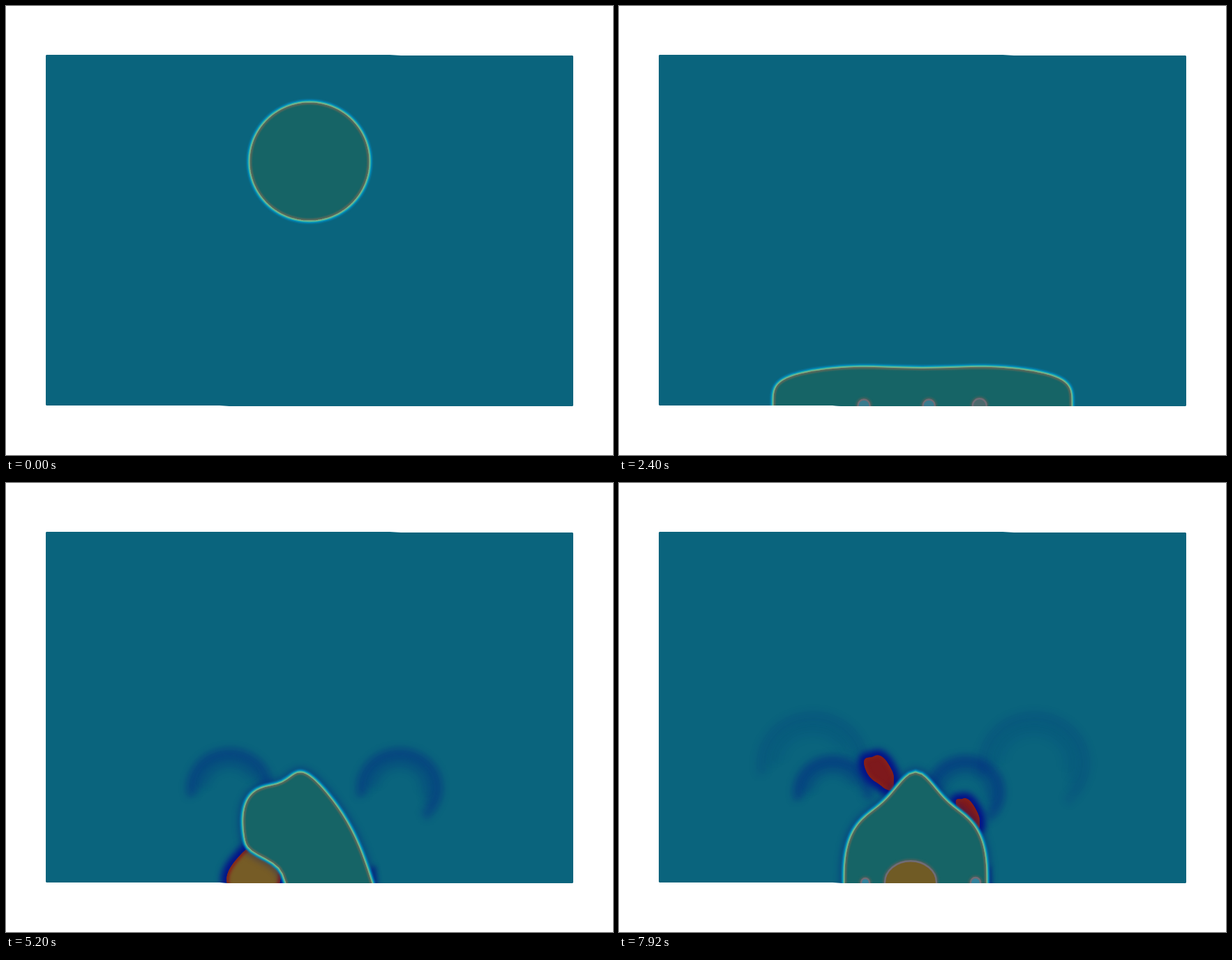
These frames come from a looping animation (870x644 px, 8 s). An HTML page with a canvas:

```html
<!DOCTYPE html>
<html lang="en">
<head>
<meta charset="utf-8">
<title>Falling drop</title>
<style>
  html, body { margin: 0; width: 100%; height: 100%; overflow: hidden; background: #fff; }
  canvas { display: block; }
</style>
</head>
<body>
<canvas id="stage" width="870" height="644"></canvas>
<script>
const ctx = document.getElementById('stage').getContext('2d');
const LOOP = 8000, STEP = 80, FLOOR = 574, TAU = Math.PI * 2;
const clamp = v => Math.max(0, Math.min(1, v));
const mix = (a, b, u) => a + (b - a) * u;

// Drop poses: half width, height and squareness, two humps, lean and undercut
const poses = [
  { t: 0, x: 435, w: 87, h: 86, n: 2 },
  { t: 1.7, x: 435, w: 84, h: 82, n: 2.4 },
  { t: 2, x: 435, w: 124, h: 100, n: 2.6 },
  { t: 2.4, x: 435, w: 215, h: 54, n: 4, left: 4, right: 4 },
  { t: 2.9, x: 435, w: 250, h: 38, n: 3, left: 10, right: 10 },
  { t: 3.6, x: 441, w: 222, h: 35, n: 3, left: 44, right: 44, at: 0.54 },
  { t: 4.4, x: 435, w: 150, h: 85, n: 3, left: 20, right: 25 },
  { t: 5.2, x: 442, w: 84, h: 141, n: 2.8, right: 24, lean: 45, cut: 42 },
  { t: 6.32, x: 417, w: 195, h: 61, n: 3.2, right: 21, at: 0.38 },
  { t: 7.92, x: 425, w: 103, h: 113, n: 2.8, right: 47, at: 0 }
].map(p => ({ left: 0, right: 0, at: 0.45, lean: 0, cut: 0, ...p }));

function poseAt(t) {
  const i = Math.max(1, poses.findIndex(p => p.t >= t));
  const a = poses[i - 1], b = poses[i], u = clamp((t - a.t) / (b.t - a.t)), pose = {};
  for (const k in a) pose[k] = mix(a[k], b[k], u);
  return pose;
}

// Superellipse in free fall; once landed its lower half is hidden by the floor
function dropPath(t) {
  const p = poseAt(t), path = new Path2D();
  const y = Math.min(FLOOR, 223 + 86.3 * t * t);
  const hump = d => Math.exp(-((d / 0.36) ** 2));
  for (let i = 0; i < 180; i++) {
    const a = i / 180 * TAU, c = Math.cos(a), s = Math.sin(a);
    const u = Math.sign(c) * Math.abs(c) ** (2 / p.n);
    const e = Math.abs(s) ** (2 / p.n);
    const rise = s < 0
      ? e * (p.h + p.left * hump(u + p.at) + p.right * hump(u - p.at))
      : -e * p.h;
    const z = Math.max(0, rise / p.h);
    const under = c < 0 ? p.cut * Math.exp(-((z / 0.28) ** 4)) : 0;
    path.lineTo(p.x + p.w * u - p.lean * z + under, y - rise);
  }
  path.closePath();
  return path;
}

function stroke(path, color, width, blur = 0) {
  ctx.filter = blur ? `blur(${blur}px)` : 'none';
  ctx.strokeStyle = color;
  ctx.lineWidth = width;
  ctx.stroke(path);
  ctx.filter = 'none';
}

function inside(path, paint) {
  ctx.save();
  ctx.clip(path);
  paint();
  ctx.restore();
}

// Each rebound sheds a pair of curling trails that widen, drift apart and fade
const sheds = [
  { born: 3.6, y: 523, from: [425, 490] },
  { born: 6.6, y: 520, from: [400, 430] }
];

function drawTrails({ born, y, from }, t) {
  const age = t - born, out = 1 - Math.exp(-0.7 * Math.max(0, age));
  const alpha = clamp((age + 0.4) / 0.4) * Math.exp(-0.35 * Math.max(0, age));
  if (alpha === 0) return;
  from.forEach((x, side) => {
    const cx = x + (side ? 110 : -155) * out, cy = y - 127 * out;
    const r = 10 + 68 * out;
    for (let layer = 0; layer < 4; layer++) {
      const k = 1 - layer * 0.13, path = new Path2D();
      path.ellipse(cx, cy, r * k, r * k * 0.92, 0,
        2.9 + layer * 0.12, (side ? 7.2 : 6.5) - layer * 0.25);
      stroke(path, `rgba(6,22,134,${alpha * 0.45 / (1 + layer * 0.8)})`, 15, 5);
    }
  });
}

// Lumpy gas pockets that rise; heat turns them from ochre to red
const pockets = [
  { from: 3.2, to: 4.2, peak: 3.6, x: 421, y: 525, rx: 13, ry: 5, tilt: 0.25, heat: 0.5 },
  { from: 4.5, to: 5.8, peak: 5.2, x: 360, y: 560, rx: 50, ry: 36, tilt: -1.05, heat: 0 },
  { from: 5.8, to: 7.3, peak: 6.32, x: 387, y: 491, rx: 44, ry: 21, tilt: -0.35, heat: 0.3 },
  { from: 6.9, to: 8.4, peak: 7.92, x: 374, y: 414, rx: 28, ry: 16, tilt: 0.9, heat: 1 },
  { from: 7.2, to: 8.4, peak: 7.92, x: 501, y: 472, rx: 25, ry: 11, tilt: 0.95, heat: 1 }
];

function drawPocket(p, t) {
  const alpha = clamp(Math.min(t - p.from, p.to - t) / 0.4);
  if (alpha === 0) return;
  const y = p.y - 45 * (t - p.peak), path = new Path2D();
  const c = Math.cos(p.tilt), s = Math.sin(p.tilt);
  for (let i = 0; i < 60; i++) {
    const a = i / 60 * TAU, k = 1 + 0.09 * Math.sin(3 * a + 1) + 0.04 * Math.sin(5 * a);
    const u = p.rx * k * Math.cos(a), v = p.ry * k * Math.sin(a);
    path.lineTo(p.x + u * c - v * s, y + u * s + v * c);
  }
  path.closePath();
  ctx.globalAlpha = alpha;
  stroke(path, '#04108a', 16, 5);
  ctx.fillStyle = `rgb(${118 + 8 * p.heat},${92 - 67 * p.heat},${38 - 10 * p.heat})`;
  ctx.fill(path);
  inside(path, () => stroke(path, '#86201a', 7, 2));
  ctx.globalAlpha = 1;
}

// Floor bubbles grow with the square root of time, then shrink away
const bubbles = [
  { born: 2.1, full: 3.6, x: 352, to: 347, r: 19 },
  { born: 2.1, full: 3.6, x: 447, to: 433, r: 19 },
  { born: 2.1, full: 3.6, x: 508, to: 552, r: 22 },
  { born: 3, full: 3.6, x: 512, to: 512, r: 9 },
  { born: 3, full: 3.6, x: 637, to: 637, r: 8 },
  { born: 5.9, full: 6.32, x: 301, to: 301, r: 14 },
  { born: 5.9, full: 7.92, x: 436, to: 418, r: 37 },
  { born: 5.9, full: 6.32, x: 502, to: 502, r: 17 },
  { born: 5.9, full: 6.32, x: 550, to: 550, r: 10 },
  { born: 7.2, full: 7.92, x: 353, to: 353, r: 6 },
  { born: 7.2, full: 7.92, x: 511, to: 511, r: 7 }
];

function drawBubble(b, t) {
  const u = clamp((t - b.born) / (b.full - b.born));
  const r = b.r * Math.sqrt(u) * clamp(1 - (t - b.full) / 1.2);
  if (r < 0.5) return;
  const path = new Path2D();
  path.ellipse(mix(b.x, b.to, u), FLOOR - 1, r, r * (r > 25 ? 0.83 : 1), 0, 0, TAU);
  // Tiny bubbles keep a bluish core
  const warm = clamp((r - 8) / 4), big = clamp(r / 38);
  ctx.fillStyle = `rgb(${mix(50, 104 + 8 * big, warm)},${mix(130, 70 + 22 * big, warm)},${mix(155, 58 - 22 * big, warm)})`;
  stroke(path, '#4b605c', 6, 1.5);
  ctx.fill(path);
  stroke(path, '#706c76', 2.4, 0.7);
}

function drawDrop(t) {
  const path = dropPath(t);
  if (t > 3.2) stroke(path, 'rgba(4,20,130,.3)', 14, 4);
  stroke(path, '#0088bd', 6, 1.2);
  ctx.fillStyle = '#166466';
  ctx.fill(path);
  inside(path, () => {
    stroke(path, '#5f6858', 8, 1.3);
    bubbles.forEach(b => drawBubble(b, t));
  });
  stroke(path, '#20b0b2', 2.8, 0.6);
  inside(path, () => stroke(path, '#86b283', 2.8, 0.5));
}

// Dark wake at the right foot
function drawFoot(t) {
  const p = poseAt(t), x = p.x + p.w;
  const path = new Path2D(`M${x + 2} 580L${x} 550`);
  stroke(path, `rgba(4,20,130,${0.6 * clamp((t - 3.1) * 2)})`, 9, 3);
}

const plate = new Path2D('M58 70H550L566 71H812L813 72V573L812 574H320L306 573H58L57 572V71Z');

function draw(t) {
  ctx.clearRect(0, 0, 870, 644);
  inside(plate, () => {
    ctx.fillStyle = '#0a647d';
    ctx.fillRect(0, 0, 870, 644);
    sheds.forEach(s => drawTrails(s, t));
    drawFoot(t);
    pockets.forEach(p => drawPocket(p, t));
    drawDrop(t);
  });
}

let start, shown = 0;
function tick(now) {
  start ??= now;
  const ms = Math.floor(((now - start) % LOOP) / STEP) * STEP;
  if (ms !== shown) draw((shown = ms) / 1000);
  requestAnimationFrame(tick);
}
draw(0);
requestAnimationFrame(tick);
</script>
</body>
</html>
```
